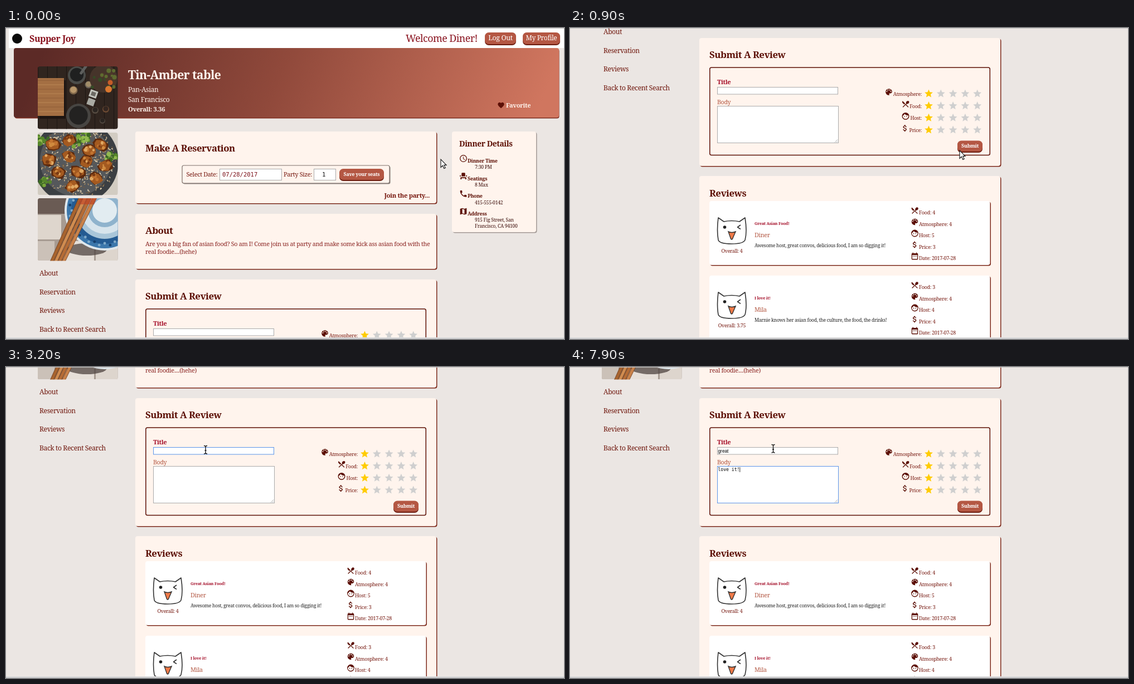
An HTML page for the animation above (8 s loop, 1001 by 559 pixels).

```html
<!DOCTYPE html>
<html lang="en">
<head>
<meta charset="utf-8">
<title>Dinner page</title>
<style>
html, body { margin: 0; width: 100%; height: 100%; overflow: hidden; background: #ebe6e3; }
svg { display: block; width: 1001px; height: 559px; }
text, .just { font-family: "Noto Serif", serif; letter-spacing: -.03em; white-space: pre; }
.mono { font-family: "DejaVu Sans Mono", monospace; letter-spacing: 0; }
.sans { font-family: "Liberation Sans", Arial, sans-serif; letter-spacing: 0; }
.just { font-size: 8.45px; line-height: 10.6px; color: #222; white-space: normal; text-align: justify; text-align-last: justify; }
.just div:last-child { text-align-last: left; }
</style>
</head>
<body>
<svg id="stage" viewBox="0 0 1001 559" xmlns="http://www.w3.org/2000/svg"></svg>
<script>
const DARK = '#5c1006', MAROON = '#76180f', RED = '#a5102a', RUST = '#b35843', CARD = '#fff4ed';

const ICONS = {
  heart: 'M12 21.35l-1.45-1.32C5.4 15.36 2 12.28 2 8.5 2 5.42 4.42 3 7.5 3c1.74 0 3.41.81 4.5 2.09C13.09 3.81 14.76 3 16.5 3 19.58 3 22 5.42 22 8.5c0 3.78-3.4 6.86-8.55 11.54z',
  palette: 'M12 3a9 9 0 0 0 0 18c.83 0 1.5-.67 1.5-1.5 0-.8-.77-1.1-.77-2 0-.83.67-1.5 1.5-1.5H16c2.76 0 5-2.24 5-5 0-4.42-4.03-8-9-8z' +
    [[6.5, 10.5], [9.5, 6.5], [14.5, 6.5], [17.5, 10.5]].map(([x, y]) => `M${x - 1.5} ${y}a1.5 1.5 0 1 0 3 0 1.5 1.5 0 0 0-3 0z`).join(''),
  food: 'M8.1 13.34l2.83-2.83L3.91 3.5c-1.56 1.56-1.56 4.09 0 5.66zm6.78-1.81c1.53.71 3.68.21 5.27-1.38 1.91-1.91 2.28-4.65.81-6.12-1.46-1.46-4.2-1.1-6.12.81-1.59 1.59-2.09 3.74-1.38 5.27L3.7 19.87l1.41 1.41L12 14.41l6.88 6.88 1.41-1.41L13.41 13z',
  face: 'M12 2a10 10 0 1 0 0 20 10 10 0 0 0 0-20zm0 18a8 8 0 0 1-7.95-8.86C6.4 10.1 8.3 8.2 9.26 5.77A10 10 0 0 0 19.67 9.74 8 8 0 0 1 12 20zM9 11.75a1.25 1.25 0 1 0 0 2.5 1.25 1.25 0 0 0 0-2.5zm6 0a1.25 1.25 0 1 0 0 2.5 1.25 1.25 0 0 0 0-2.5z',
  dollar: 'M11.8 10.9c-2.27-.59-3-1.2-3-2.15 0-1.09 1.01-1.85 2.7-1.85 1.78 0 2.44.85 2.5 2.1h2.21c-.07-1.72-1.12-3.3-3.21-3.81V3h-3v2.16c-1.94.42-3.5 1.68-3.5 3.61 0 2.31 1.91 3.46 4.7 4.13 2.5.6 3 1.48 3 2.41 0 .69-.49 1.79-2.7 1.79-2.06 0-2.87-.92-2.98-2.1h-2.2c.12 2.19 1.76 3.42 3.68 3.83V21h3v-2.15c1.95-.37 3.5-1.5 3.5-3.55 0-2.84-2.43-3.81-4.7-4.4z',
  date: 'M9 11H7v2h2zm4 0h-2v2h2zm4 0h-2v2h2zm2-7h-1V2h-2v2H8V2H6v2H5a2 2 0 0 0-2 2v14a2 2 0 0 0 2 2h14a2 2 0 0 0 2-2V6a2 2 0 0 0-2-2zm0 16H5V9h14z',
  clock: 'M12 2a10 10 0 1 0 0 20 10 10 0 0 0 0-20zm0 18a8 8 0 1 1 0-16 8 8 0 0 1 0 16zM12.5 7H11v6l5.25 3.15.75-1.23-4.5-2.67z',
  seat: 'M4 18v3h3v-3h10v3h3v-6H4zm15-8h3v3h-3zM2 10h3v3H2zm15 3H7V5a2 2 0 0 1 2-2h6a2 2 0 0 1 2 2z',
  phone: 'M6.62 10.79a15 15 0 0 0 6.59 6.59l2.2-2.2a1 1 0 0 1 1.02-.24c1.12.37 2.33.57 3.57.57a1 1 0 0 1 1 1V20a1 1 0 0 1-1 1A17 17 0 0 1 3 4a1 1 0 0 1 1-1h3.5a1 1 0 0 1 1 1c0 1.25.2 2.45.57 3.57a1 1 0 0 1-.25 1.02z',
  map: 'M20.5 3L15 5.1 9 3 3 5v16l6-2.1 6 2.1 6-2V3zM15 19l-6-2.11V5l6 2.11z',
  star: 'M12 17.27L18.18 21l-1.64-7.03L22 9.24l-7.19-.61L12 2 9.19 8.63 2 9.24l5.46 4.73L5.82 21z'
};

const range = n => [...Array(n).keys()];
const rect = (x, y, w, h, fill, more = '') => `<rect x="${x}" y="${y}" width="${w}" height="${h}" fill="${fill}" ${more}/>`;
const disc = (x, y, r, fill, more = '') => `<circle cx="${x}" cy="${y}" r="${r}" fill="${fill}" ${more}/>`;
const path = (d, fill, more = '') => `<path d="${d}" fill="${fill}" ${more}/>`;
const text = (x, y, size, s, fill, more = '') => `<text x="${x}" y="${y}" font-size="${size}" fill="${fill}" ${more}>${s}</text>`;
const bold = (x, y, size, s, fill, more = '') => text(x, y, size, s, fill, 'font-weight="700" ' + more);
const MID = 'text-anchor="middle"', END = 'text-anchor="end"';
const icon = (name, x, y, k = .65, fill = DARK) =>
  path(ICONS[name], fill, `fill-rule="evenodd" transform="translate(${x - 12 * k} ${y - 12 * k}) scale(${k})"`);
const card = (x, y, w, h, fill = CARD, shade = '#7d2a1c') =>
  rect(x + 1.5, y + 1.5, w, h, shade, 'rx="4"') + rect(x, y, w, h, fill, 'rx="4"');
const button = (x, y, w, h, s, size, weight) =>
  rect(x, y + 1, w, h, '#6d1d10', 'rx="7"') + rect(x, y, w, h - 1, '#b45743', 'rx="7"') +
  text(x + w / 2, y + h / 2 + size * .28, size, s, '#fff', `${MID} font-weight="${weight}"`);
const field = (x, y, w, h, id = '') => rect(x, y, w, h, '#fff', `stroke="#aaa" ${id}`);

let seed = 7;
const rnd = (a, b) => (seed = seed * 16807 % 2147483647, a + (b - a) * seed / 2147483647);
const pick = list => list[rnd(0, list.length) | 0];

function header() {
  return rect(5, 1, 996, 35, '#fff') + disc(20, 19, 9, '#0b0b0b') +
    bold(42, 25, 16, 'Supper Joy', '#8a1420') +
    text(846, 25, 17.8, 'Welcome Diner!', '#8a1420', END) +
    button(859, 8, 56, 22, 'Log Out', 12.4, 400) + button(927, 8, 67, 22, 'My Profile', 12, 400);
}

function banner() {
  return rect(15.5, 37.5, 977, 125, '#7d2a1c', 'rx="4"') + rect(14, 36, 978, 125, 'url(#warm)', 'rx="4"') +
    bold(219, 92, 21.2, 'Tin-Amber table', '#fff4ed') +
    text(219, 115, 12, 'Pan-Asian', '#fff4ed') + text(219, 132.5, 12, 'San Francisco', '#fff4ed') +
    bold(219, 150, 11.2, 'Overall: 3.36', '#fff4ed') +
    icon('heart', 888, 139, .57) + bold(897, 143, 11, 'Favorite', '#fff4ed');
}

function reservation() {
  return card(232, 186, 540, 129) + bold(250, 222, 16.8, 'Make A Reservation', DARK) +
    rect(317.5, 248.5, 372, 32, '#8d8580', 'rx="3"') +
    rect(316, 247, 372, 32, CARD, 'rx="3" stroke="#7d706a" stroke-width="1.2"') +
    text(323.5, 267, 10.9, 'Select Date:', MAROON) + field(383.5, 253.5, 111, 20) +
    text(388, 267, 10.5, '07/28/2017', '#7a0e16', 'class="mono"') +
    text(498, 267, 10.9, 'Party Size:', MAROON) + field(552.5, 253.5, 39, 20) +
    text(567, 267, 10.5, '1', '#111', 'class="mono"') +
    button(598, 253, 80, 21, 'Save your seats', 8.8, 700) +
    bold(760, 305, 11.3, 'Join the party...', MAROON, END);
}

function about() {
  return card(232, 334, 540, 99) + bold(250, 370, 16.8, 'About', DARK) +
    text(250, 391.5, 10.78, 'Are you a big fan of asian food? So am I! Come join us at party and make some kick ass asian food with the', '#8a2422') +
    text(250, 405.5, 10.78, 'real foodie....(hehe)', '#8a2422');
}

function details() {
  const rows = [['clock', 'Dinner Time', '7:30 PM'], ['seat', 'Seatings', '8 Max'],
    ['phone', 'Phone', '415-555-0142'], ['map', 'Address', '915 Fig Street, San']];
  return card(800, 186, 151, 181, CARD, '#a39a96') + bold(813, 213, 13.8, 'Dinner Details', DARK) +
    rows.map(([name, label, value], i) => {
      const y = 234.5 + i * 31.7;
      return icon(name, 820.5, y) + bold(828, y + 7.3, 8.9, label, DARK) + text(841, y + 18.7, 8.6, value, '#3a0d0a');
    }).join('') + text(841, 359, 8.6, 'Francisco, CA 94100', '#3a0d0a');
}

function form() {
  const rows = [['palette', 'Atmosphere', 572], ['food', 'Food', 602], ['face', 'Host', 602], ['dollar', 'Price', 601]];
  return card(232, 452, 540, 230) + bold(250, 488, 16.8, 'Submit A Review', DARK) +
    rect(250.8, 505, 502.5, 157.5, 'none', `rx="3" stroke="${DARK}" stroke-width="1.5"`) +
    bold(264, 535, 11.2, 'Title', RED) + field(264.5, 540.5, 216, 12.5, 'id="titleBox"') +
    text(264, 570.5, 10.6, 'Body', RUST) + field(264.5, 574.5, 217, 66, 'id="bodyBox"') +
    path('M475 639.5l5-5M478 639.5l2-2', 'none', 'stroke="#888" stroke-width=".7"') +
    text(265.5, 550, 8.3, '', '#000', 'id="titleText" class="sans"') +
    text(265.5, 583, 8.1, '', '#000', 'id="bodyText" class="mono"') +
    rect(266, 576, .8, 9, '#000', 'id="caret"') +
    rows.map(([name, label, x], i) => {
      const y = 549 + i * 21.7;
      return icon(name, x, y) + text(631, y + 7, 8.9, label + ':', MAROON, END) +
        range(5).map(j => icon('star', 643.5 + j * 21.8, y + 2.8, .74, j ? '#cfcfcf' : '#ffcc00')).join('');
    }).join('') + button(695, 636.5, 45, 20.5, 'Submit', 9, 700);
}

function review(top, title, name, body, scores, overall) {
  const long = Array.isArray(body), up = long ? -15.5 : 0;
  const labels = ['Food', 'Atmosphere', 'Host', 'Price', 'Date'];
  const names = ['food', 'palette', 'face', 'dollar', 'date'];
  const cat = 'fill="none" stroke="#333" stroke-width="1.6" stroke-linejoin="round"';
  return `<g transform="translate(0 ${top})">` + card(250, 0, 503.5, 115, '#fff') +
    `<g transform="translate(264 29)"><path d="M2 1L12 8Q26 5 40 8L50 1Q54 26 50 41Q47 48 26 48Q4 48 2 41Q-1 24 2 1Z" ${cat}/>` +
    disc(13.5, 18, 2.8, '#222') + `<path d="M42 14L36.5 18L42 21.5" ${cat}/>` +
    path('M20 26Q26 29 33 26L27.5 39Q26 41 24.5 39Z', '#f07a48', 'stroke="#333" stroke-width="1.4"') + '</g>' +
    text(290.5, 93, 8.9, 'Overall: ' + overall, MAROON, MID) +
    bold(331, 42.5 + up, 7.3, title, RED) + text(331, 65 + up, 10.8, name, RUST) +
    (long
      ? `<foreignObject x="331" y="58.5" width="274" height="46"><div class="just">${body.map(s => `<div>${s}</div>`).join('')}</div></foreignObject>`
      : text(331, 82.5, 8.5, body, '#222')) +
    labels.map((l, i) => icon(names[i], 618.5, 17 + i * 20.5, .64) +
      text(626, 24 + i * 20.5, 9, `${l}: ${scores[i] || '2017-07-28'}`, MAROON)).join('') + '</g>';
}

function reviews() {
  return card(232, 700, 540, 700) + bold(250, 737, 16.8, 'Reviews', DARK) +
    review(745, 'Great Asian Food!', 'Diner', 'Awesome host, great convos, delicious food, I am so digging it!', [4, 4, 5, 3], 4) +
    review(879, 'I love it!', 'Mila', 'Marnie knows her asian food, the culture, the food, the drinks!', [3, 4, 4, 4], 3.75) +
    review(1013, 'What Can I say?', 'Bert', [
      '5 stars - Dinner at Bert’ was a very rewarding experience - the food, the',
      'ambiance and the service were top notch. We ordered a few tapas that',
      'included vegetables, rabbit, and fish and all were delicious',
      'complemented by exquisite sauces. It was certainly a feast in the mouth.'], [5, 1, 3, 5], 3.5);
}

const photo = (y, art) => `<g transform="translate(57 ${y})" clip-path="url(#frame)">${art}</g>`;

function tableArt() {
  const bowl = (x, y, r, rim, inside) => disc(x, y, r, rim) + disc(x, y - 1, r * .76, inside);
  return rect(0, 0, 144, 113, '#30251f') +
    range(9).map(i => rect(i * 17, 0, 1, 113, '#1d1613')).join('') +
    rect(3, 25, 47, 69, '#1d1512') + rect(0, 21, 47, 68, '#a46f43') +
    range(8).map(i => rect(0, 24 + i * 8, 47, 2, i % 2 ? '#b88453' : '#93603a', 'opacity=".6"')).join('') +
    bowl(70, 16, 16, '#4b4c49', '#1f2020') + rect(78, -4, 5, 19, '#5d5e5c', 'rx="2" transform="rotate(35 80 8)"') +
    bowl(73, 89, 22, '#474542', '#232221') + bowl(64, 43, 7.5, '#7d6549', '#b8976a') + bowl(91, 33, 6.5, '#6b6258', '#a08c68') +
    rect(93, 43, 14, 13, '#c3c4bc', 'transform="rotate(20 100 49)"') + rect(96, 46, 8, 7, '#6d6a63', 'transform="rotate(20 100 49)"') +
    rect(89, 58, 13, 12, '#a9aaa3', 'transform="rotate(20 95 64)"') +
    disc(118, 22, 25, '#46342a') +
    range(22).map(() => disc(rnd(98, 140), rnd(6, 40), rnd(2, 5), pick(['#354a25', '#5e6b30', '#4d3829', '#2a231b']))).join('') +
    disc(127, 41, 6, '#d9772f') + disc(130, 29, 4.5, '#c65d28') +
    bowl(103, 79, 6, '#574c42', '#2b2521') + bowl(122, 77, 6, '#6c4a32', '#332620') + bowl(116, 98, 5, '#4f463e', '#2a2420');
}

function chickenArt() {
  const bits = [[27, 21], [56, 14], [93, 32], [20, 49], [56, 43], [88, 52], [121, 60], [37, 71], [72, 70], [104, 82], [62, 96], [113, 22]];
  const sprigs = [[73, 17], [10, 14], [82, 6], [132, 41], [12, 88]];
  const chunk = r => 'M' + range(9).map(i => {
    const a = i * .698, k = r * rnd(.78, 1.15);
    return `${(k * Math.cos(a)).toFixed(1)} ${(k * .82 * Math.sin(a)).toFixed(1)}`;
  }).join('L') + 'Z';
  return rect(0, 0, 144, 112, '#d2ccc2') + disc(68, 52, 77, '#3b3f43') + disc(68, 50, 64, '#55585b') +
    range(520).map(() => {
      const a = rnd(0, 6.28), r = 68 * Math.sqrt(rnd(.02, 1)), x = 74 + r * Math.cos(a), y = 48 + r * Math.sin(a);
      return rect(x, y, 3.6, 1.5, pick(['#ead9b8', '#d2bd98', '#a98d64', '#6f5a42']), `rx=".7" transform="rotate(${rnd(0, 180) | 0} ${x} ${y})"`);
    }).join('') +
    sprigs.map(([x, y]) =>
      range(16).map(() => disc(x + rnd(-10, 10), y + rnd(-8, 8), rnd(2, 4.5), pick(['#56852b', '#79a63b', '#3d6a24', '#93ba50']))).join('')).join('') +
    bits.map(([x, y]) => `<g transform="translate(${x} ${y}) rotate(${rnd(-50, 50) | 0})">` +
      path(chunk(14), '#5d2a0e') + path(chunk(12), '#a45a20') +
      range(7).map(() => disc(rnd(-7, 7), rnd(-7, 5), rnd(1.5, 3.5), pick(['#d08a3e', '#c37430', '#7a3a13', '#e0a862']))).join('') + '</g>').join('');
}

function bowlArt() {
  const ring = (r, fill) => disc(120, 22, r, fill);
  const stick = (top, foot, fill) => path(`M${top} -2h7L${foot + 6} 114h-6Z`, fill, 'stroke="#6b3a1c" stroke-width=".8"');
  return rect(0, 0, 144, 112, '#a79b92') + rect(0, 0, 55, 28, '#6a5b54') +
    rect(0, 30, 42, 44, '#ded6cd') + rect(0, 77, 30, 35, '#cbc1b8') + rect(45, 77, 56, 35, '#e6dfd8') + rect(104, 77, 40, 35, '#ddd5cd') +
    '<ellipse cx="88" cy="92" rx="36" ry="11" fill="#4f4440" opacity=".75"/>' +
    ring(72, '#dfe7ec') + ring(68, '#3c77ab') + ring(60, '#245b92') + ring(51, '#a9c6d9') +
    range(40).map(i => {
      const a = i * .157, r = 59 + 4 * (i % 2);
      return disc(120 + r * Math.cos(a), 22 + r * Math.sin(a), 2.4, i % 3 ? '#7fa9c8' : '#163f6b');
    }).join('') +
    ring(42, '#d7e4ec') + ring(30, '#8fb3cd') + ring(22, '#e2ecf1') +
    stick(74, 22, '#a8642f') + stick(82, 29, '#d08c50') + stick(90, 36, '#b56c36') + stick(99, 43, '#c9824a') +
    path('M76 0L106 0L101 11L72 11Z', '#c23f22', 'opacity=".6"');
}

function sidebar() {
  return photo(69, tableArt()) + photo(188, chickenArt()) + photo(306, bowlArt()) +
    ['About', 'Reservation', 'Reviews', 'Back to Recent Search'].map((s, i) => text(60, 445 + i * 33.6, 12.1, s, '#6f160c')).join('');
}

const stage = document.getElementById('stage');
stage.innerHTML = `<defs>
  <linearGradient id="warm" x1="0" y1=".1" x2="1" y2=".15"><stop offset=".05" stop-color="#5c2a26"/><stop offset=".5" stop-color="#90493b"/><stop offset="1" stop-color="#d0765f"/></linearGradient>
  <clipPath id="frame"><rect width="143.5" height="112.5" rx="4"/></clipPath></defs>` +
  rect(0, 0, 1001, 559, '#ebe6e3') +
  `<g id="page">${header()}${banner()}${reservation()}${about()}${details()}${form()}${reviews()}</g><g id="side">${sidebar()}</g>` +
  rect(0, 0, 1001, 1, '#c6c4c4') + rect(0, 556, 1001, 3, '#ededed') + rect(0, 557, 1001, 1.2, '#b5b5b8') +
  path('M0 0V14.5L3.4 11.3L5.8 16.6L8.2 15.5L5.8 10.4H10Z', '#fff', 'id="arrow" stroke="#111" stroke-width="1.1"') +
  path('M-3 -7Q0 -7 0 -5Q0 -7 3 -7M0 -5V6M-3 7.5Q0 7.5 0 5.5Q0 7.5 3 7.5M-1.5 1.5H1.5', 'none', 'id="beam" stroke="#111" stroke-width="1.3"');

const ui = {};
for (const id of ['page', 'side', 'titleBox', 'bodyBox', 'titleText', 'bodyText', 'caret', 'arrow', 'beam']) ui[id] = document.getElementById(id);

const SCROLL = [[0, 0], [200, 0], [300, 22], [500, 127], [700, 278], [900, 434], [1000, 505], [1100, 555], [1200, 580],
  [1300, 580], [1400, 572], [1600, 510], [1800, 436], [2000, 403], [2200, 396]];
const POINTER = [[0, 780, 236], [100, 768, 234], [400, 701, 221], [500, 700, 221], [900, 699, 220], [1400, 697, 217],
  [1700, 640, 200], [2000, 430, 160], [2200, 344, 145]];
const BEAM = [[0, 350, 155], [2500, 354, 151], [2600, 358, 148.5], [7900, 364.5, 146.5]];
const BODY = [[0, ''], [4600, 'l'], [4700, 'lo'], [4900, 'love'], [5400, 'love t'], [5500, 'love '], [5700, 'love i'],
  ...range(7).map(i => [5900 + i * 100, 'love it'.slice(0, i + 1)]), [6700, 'love it1'], [7100, 'love it'], [7300, 'love it!']];

const hold = (keys, t) => keys.filter(k => k[0] <= t).pop();
function tween(keys, t, col = 1) {
  const a = hold(keys, t), b = keys[keys.indexOf(a) + 1];
  return b ? a[col] + (b[col] - a[col]) * (t - a[0]) / (b[0] - a[0]) : a[col];
}
const move = (el, x, y) => el.setAttribute('transform', `translate(${x} ${y})`);
const show = (el, on) => el.setAttribute('visibility', on ? 'visible' : 'hidden');

function draw(ms) {
  const t = Math.floor(ms / 100) * 100;
  const y = Math.round(tween(SCROLL, t));
  move(ui.page, 0, -y);
  move(ui.side, 0, y > 440 ? -420 : -y);

  const beam = hold(BEAM, t);
  show(ui.arrow, t < 2300);
  show(ui.beam, t >= 2300);
  move(ui.arrow, tween(POINTER, t), tween(POINTER, t, 2));
  move(ui.beam, beam[1], beam[2]);

  const onBody = t >= 3900, typed = hold(BODY, t)[1];
  ui.titleBox.setAttribute('stroke', t >= 2500 && !onBody ? '#5b94e8' : '#aaa');
  ui.bodyBox.setAttribute('stroke', onBody ? '#5b94e8' : '#aaa');
  ui.titleText.textContent = 'great'.slice(0, Math.max(0, (t - 3200) / 100));
  ui.bodyText.textContent = typed;
  show(ui.caret, onBody || t >= 2600 && t < 3200);
  move(ui.caret, typed.length * 4.876 - .6, onBody ? 0 : -33.5);
}

function loop(now) {
  draw(now % 8000);
  requestAnimationFrame(loop);
}
draw(0);
requestAnimationFrame(loop);
</script>
</body>
</html>
```
